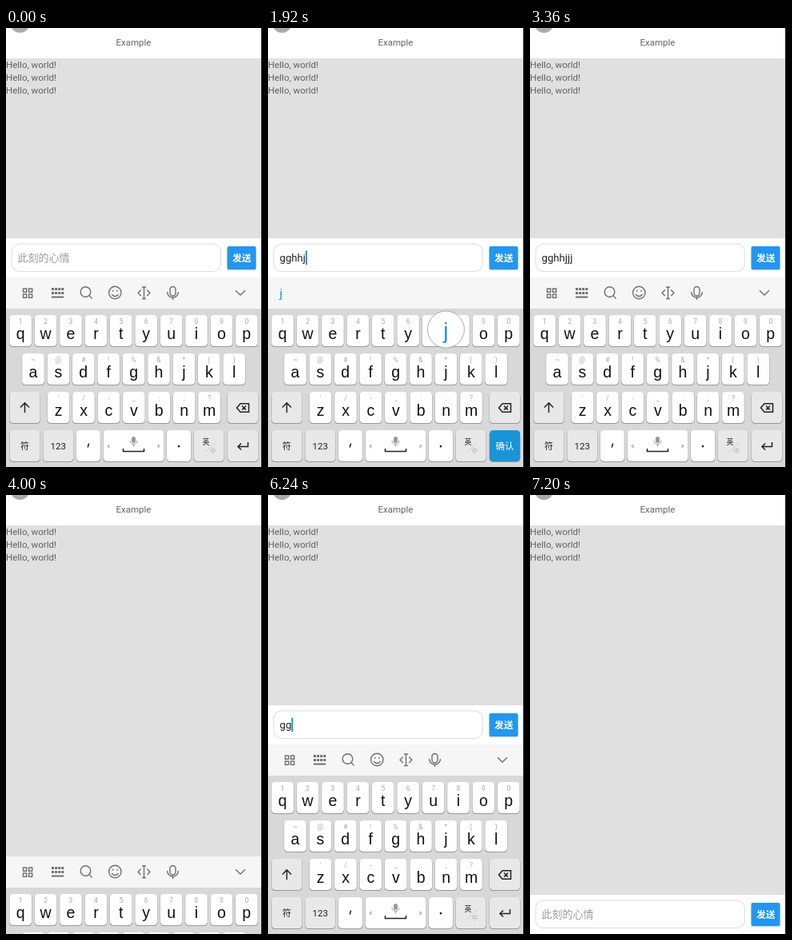
An HTML page that plays this animation: 320 by 549 pixels, repeating every 8.16 s.

```html
<!DOCTYPE html>
<html lang="zh">
<head>
<meta charset="utf-8">
<title>Chat input</title>
<style>
html, body { margin: 0; width: 100%; height: 100%; overflow: hidden; background: #fff; }
svg { display: block; width: 100%; height: 100%; }
text { font-family: Roboto, "Noto Sans CJK SC", "Noto Sans CJK", sans-serif; white-space: pre; }
.mid { text-anchor: middle; }
.cap { font-family: "Liberation Sans", Arial, sans-serif; }
.icon { fill: none; stroke: #707070; stroke-width: 1.4; }
.dark { stroke: #222; stroke-width: 1.5; }
</style>
</head>
<body>
<svg id="stage" viewBox="0 0 320 549"></svg>
<script>
const LOOP = 8160, TICK = 160, KB_HEIGHT = 237;
const BLUE = '#1a94d8', stage = document.getElementById('stage');

function add(parent, tag, attrs, content) {
  const el = document.createElementNS('http://www.w3.org/2000/svg', tag);
  for (const k in attrs) el.setAttribute(k, attrs[k]);
  if (content !== undefined) el.textContent = content;
  parent.appendChild(el);
  return el;
}
const group = parent => add(parent, 'g', {});
const rect = (p, x, y, width, height, fill, rx = 0) => add(p, 'rect', { x, y, width, height, fill, rx });
const label = (p, x, y, size, fill, s, cls = 'mid') =>
  add(p, 'text', { x, y, 'font-size': size, fill, class: cls }, s);
const icon = (p, d, cls = 'icon') => add(p, 'path', { d, class: cls });
const show = (el, on) => el.setAttribute('display', on ? 'inline' : 'none');

// Page
rect(stage, 0, 0, 320, 549, '#fff');
add(stage, 'circle', { cx: 17.5, cy: -6, r: 12, fill: '#aaa' });
label(stage, 159.5, 22, 11.5, '#666', 'Example');
const list = rect(stage, 0, 38, 319, 225, '#e0e0e0');
for (let i = 0; i < 3; i++) label(stage, 0, 50.2 + i * 15.7, 11.5, '#606060', 'Hello, world!', '');

// Input bar, placed relative to its own top
const bar = group(stage);
rect(bar, 0, 0, 319, 56, '#fff');
add(bar, 'rect', { x: 7, y: 7, width: 261.5, height: 34.5, rx: 10, fill: '#fff', stroke: '#ddd' });
const hint = label(bar, 14.5, 29.3, 13, '#9c9c9c', '此刻的心情', '');
const typed = label(bar, 14.5, 29, 13.2, '#222', '', '');
const caret = rect(bar, 0, 15.5, 2, 17.5, BLUE);
rect(bar, 276.5, 11, 36.5, 29.5, '#000', 2).setAttribute('opacity', .13);
rect(bar, 276.5, 10, 36, 29, '#2196f3', 2);
label(bar, 294.7, 29, 11.8, '#fff', '发送').setAttribute('font-weight', 700);

// Keyboard
const kb = group(stage);
rect(kb, 0, 312, 319, 39, '#f6f6f6');
rect(kb, 0, 351, 319, 198, '#d8d8d8');

const tools = group(kb);
for (const x of [21.5, 28.5]) for (const y of [326, 333]) icon(tools, `M${x} ${y}h4.2v4.2h-4.2z`);
for (let r = 0; r < 2; r++)
  for (let c = 0; c < 4; c++) rect(tools, 57 + c * 4.1, 325 + r * 5, 3, 3, '#707070');
rect(tools, 57, 335.5, 15.3, 2, '#707070');
icon(tools, 'M105.8 330a6.3 6.3 0 1 1-12.6 0a6.3 6.3 0 1 1 12.6 0M104.2 334.6l3.4 4');
icon(tools, 'M144 331a7.7 7.7 0 1 1-15.4 0a7.7 7.7 0 1 1 15.4 0M132 333q4.3 5 8.6 0M133.7 327.7v2M139 327.7v2');
icon(tools, 'M170 324h5M172.5 324v14.5M170 338.5h5M168.7 327.5l-3.6 3.7 3.6 3.7M176.3 327.5l3.6 3.7-3.6 3.7');
icon(tools, 'M205 327a3.5 3.5 0 0 1 7 0v4.5a3.5 3.5 0 0 1-7 0zM201.5 330a7 7 0 0 0 14 0M208.5 337v3');
icon(tools, 'M287 328.3l6 5.7 6-5.7');

const cands = group(kb);
const candXs = [14.5, 49, 92, 126.5, 165, 230];
const candTexts = candXs.map((x, i) => label(cands, x, 337, 15.5, i ? '#222' : BLUE, '', ''));
const more = group(cands);
rect(more, 278, 324, 1, 13, '#ddd');
add(more, 'path', { d: 'M289 328h9l-4.5 5.5z', fill: '#777' });

function key(x, y, w, fill = '#fff') {
  rect(kb, x - .4, y + .8, w + .8, 39.2, '#999', 4.5);
  return rect(kb, x, y, w, 39, fill, 4.5);
}
const PITCH = 31.4, keyX = {};
function letterRow(letters, marks, x0, y) {
  [...letters].forEach((c, i) => {
    const x = keyX[c] = x0 + i * PITCH;
    key(x - 13.8, y, 27.6);
    label(kb, x, y + 11, 8.5, '#aaa', marks[i]);
    label(kb, x, y + 29.5, 19.5, '#111', c, 'mid cap');
  });
}
letterRow('qwertyuiop', '1234567890', 18.2, 359);
letterRow('asdfghjkl', '~@#!%&*()', 34, 407);
letterRow('zxcvbnm', "'/-_:;?", 65.6, 455);

const GREY = '#e8e8e8';
key(4.5, 455, 38, GREY);
icon(kb, 'M23.5 481v-12M18 474.5l5.5-5.7 5.5 5.7', 'icon dark');
key(277, 455, 38, GREY);
icon(kb, 'M288.5 475l4.5-5.3h10.5v10.6h-10.5zM295 472.5l5 5M300 472.5l-5 5', 'icon dark');
key(4.5, 503, 38, GREY);
label(kb, 23.5, 527, 11, '#222', '符');
key(46.5, 503, 37.5, GREY);
label(kb, 65.3, 527, 11.5, '#222', '123');
key(88, 503, 29.8);
icon(kb, 'M103.6 519.5l-1.4 5', 'icon dark');
key(121.7, 503, 75.8);
for (const d of ['M129.5 520v6l-3.5-3z', 'M189.5 520v6l3.5-3z']) add(kb, 'path', { d, fill: '#bbb' });
rect(kb, 157, 511, 5, 8, '#999', 2.5);
add(kb, 'path', { d: 'M155 516a4.5 4.5 0 0 0 9 0M159.5 520.5v3', fill: 'none', stroke: '#999' });
icon(kb, 'M146.5 526v3.5h26v-3.5', 'icon dark');
key(201, 503, 30);
rect(kb, 214.8, 522, 2.3, 2.3, '#111');
key(234.8, 503, 37.7, GREY);
label(kb, 250, 521, 9, '#222', '英');
label(kb, 258.3, 532, 8, '#b5b5b5', '中');
add(kb, 'path', { d: 'M248 531l13-12', stroke: '#c4c4c4', 'stroke-width': .7 });

const enter = key(277, 503, 38, GREY);
const enterIcon = icon(kb, 'M302.5 518v5.5h-12M294 519.5l-4 4 4 4', 'icon dark');
const confirm = label(kb, 296, 527, 11.5, '#fff', '确认');

const bubble = group(kb);
add(bubble, 'circle', { cx: 0, cy: 377, r: 23, fill: '#fff', stroke: '#999', 'stroke-width': .8 });
const bubbleText = label(bubble, 0, 387.5, 28, BLUE, '', 'mid cap');

rect(stage, 319, 0, 1, 549, '#111');

// Typing: start time, text, pressed key, candidates, caret
const JJ = 'jj JJ jjj jjjj jjdnnd jjc', FULL = 'gghhjjj';
const steps = [
  [0, '', '', '', 0],
  [160, '', '', '', 1],
  [640, 'g', 'g', 'g', 1],
  [800, 'g', '', 'g', 1],
  [960, 'gg', 'g', 'gg', 1],
  [1120, 'ggh', 'h', 'ggh', 1],
  [1280, 'ggh', '', 'ggh', 1],
  [1440, 'gghh', 'h', 'gghh', 1],
  [1600, 'gghh', '', 'gghh', 1],
  [1920, 'gghhj', 'j', 'j', 1],
  [2240, 'gghhjj', 'j', JJ, 1],
  [2400, FULL, 'j', JJ, 1],
  [2560, FULL, '', JJ, 1],
  [2880, FULL, '', '', 1],
  [3360, FULL, '', '', 0],
  [4960, FULL, '', '', 1]
];
// Backspacing removes one letter per tick
for (let i = 1; i <= FULL.length; i++)
  steps.push([5440 + i * TICK, FULL.slice(0, -i), '', '', 1]);
steps.push([6880, '', '', '', 0]);

// How far the keyboard is pushed below its resting place
function drop(t) {
  const part = start => Math.min(1, Math.max(0, (t - start) / (3 * TICK)));
  const hide = start => KB_HEIGHT * part(start) ** 1.3;
  if (t < 4640) return hide(3680);
  if (t < 5600) return KB_HEIGHT * (1 - part(4640)) ** 3.5;
  return hide(6720);
}

function draw(ms) {
  const t = Math.floor(ms % LOOP / TICK) * TICK;
  const [, text, pressed, words, blink] = steps.filter(s => s[0] <= t).pop();
  const dy = Math.round(drop(t)), up = dy < 10;

  list.setAttribute('height', up ? 225 : 462);
  bar.setAttribute('transform', `translate(0 ${up ? 263 : 500})`);
  kb.setAttribute('transform', `translate(0 ${dy})`);
  show(kb, dy < KB_HEIGHT);

  typed.textContent = text;
  show(hint, !text);
  show(caret, blink);
  caret.setAttribute('x', 14.5 + (text ? typed.getComputedTextLength() : 0));

  const found = words ? words.split(' ') : [];
  candTexts.forEach((el, i) => el.textContent = found[i] || '');
  show(tools, !words);
  show(cands, words);
  show(more, found.length > 1);
  show(confirm, words);
  show(enterIcon, !words);
  enter.setAttribute('fill', words ? BLUE : GREY);

  show(bubble, pressed);
  if (pressed) {
    bubble.setAttribute('transform', `translate(${keyX[pressed]} 0)`);
    bubbleText.textContent = pressed;
  }
}

const begin = performance.now();
function loop() {
  draw(performance.now() - begin);
  requestAnimationFrame(loop);
}
loop();
</script>
</body>
</html>
```
